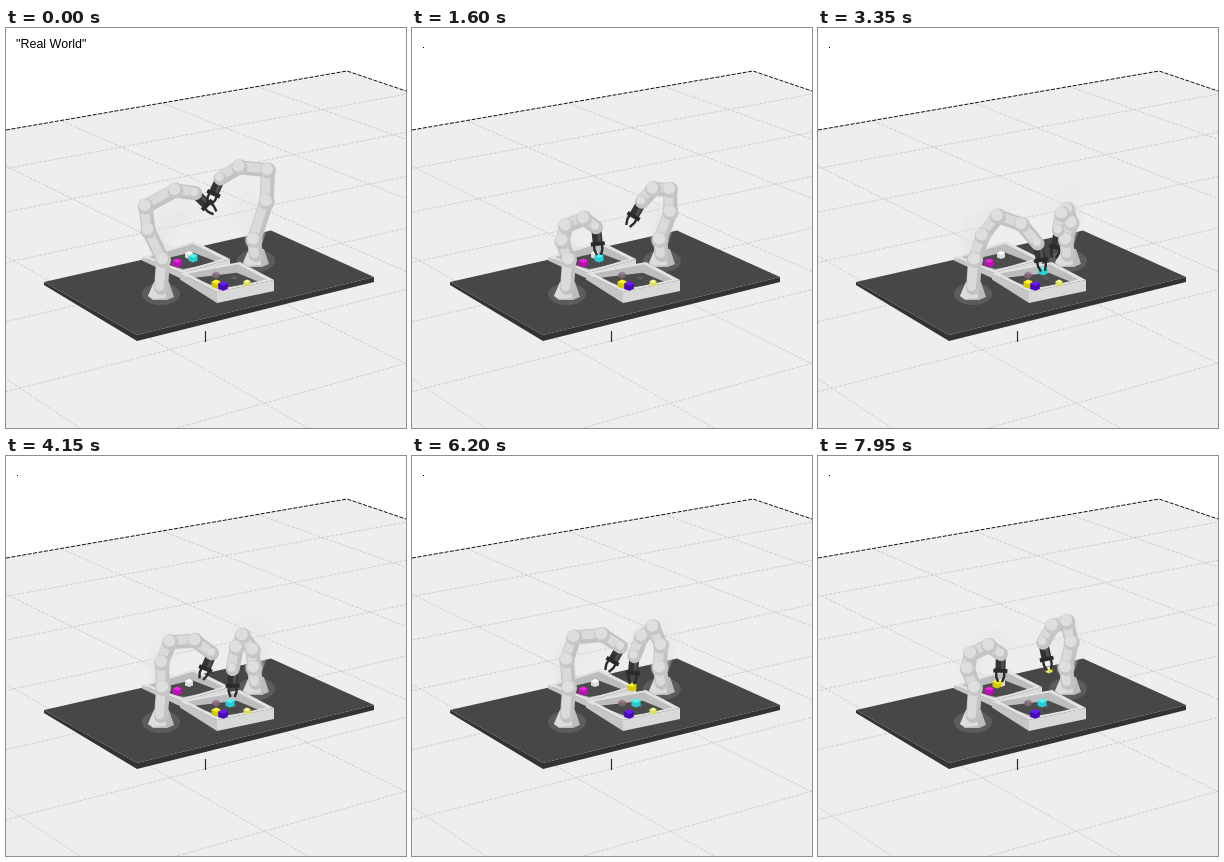
Animation of 400x400 px, one loop 8 s. Source, as an HTML page with a canvas:

```html
<!DOCTYPE html>
<html lang="en">
<head>
<meta charset="utf-8">
<title>Two robot arms sorting blocks</title>
<style>
  html, body { margin: 0; width: 100%; height: 100%; overflow: hidden; background: #fff; }
  canvas { display: block; width: 100vw; height: 100vh; }
</style>
</head>
<body>
<canvas id="stage" width="400" height="400"></canvas>
<script>
const ctx = document.getElementById('stage').getContext('2d');
const LOOP = 8000;
const GRIPPER = 28;
const STOPS = [0, 1600, 3350, 4850, 6200, 7050, 7950];

// Each reach is the fingertip's x, y and the gripper's angle in degrees at one stop.
const leftArm = {
  base: [155, 268], shoulder: [157, 232], side: 1, lift: 4,
  reaches: [[209, 185, 45], [187, 227, 84], [225, 243, 79], [171, 207, 140],
            [195, 215, 120], [228, 228, 66], [182, 226, 92]]
};
const rightArm = {
  base: [250, 235], shoulder: [248, 212], side: -1, lift: 22,
  reaches: [[203, 176, 114], [216, 198, 120], [236, 230, 100], [219, 250, 82],
            [220, 228, 95], [232, 242, 88], [231, 214, 78]]
};

const mix = (a, b, k) => a.map((v, i) => v + (b[i] - v) * k);
const shift = (p, dx, dy) => [p[0] + dx, p[1] + dy];
const clamp = v => Math.max(0, Math.min(1, v));
const ease = v => v * v * (3 - 2 * v);
const progress = (t, start, end) => ease(clamp((t - start) / (end - start)));

function trace(points) {
  ctx.beginPath();
  points.forEach(p => ctx.lineTo(...p));
}
function shape(color, ...points) {
  trace(points);
  ctx.fillStyle = color;
  ctx.fill();
}
function line(color, width, ...points) {
  trace(points);
  ctx.strokeStyle = color;
  ctx.lineWidth = width;
  ctx.stroke();
}
function oval(color, x, y, rx, ry = rx) {
  ctx.beginPath();
  ctx.ellipse(x, y, rx, ry, 0, 0, Math.PI * 2);
  ctx.fillStyle = color;
  ctx.fill();
}

// Floor position in cells from the far corner, in perspective.
function floorPoint(i, j) {
  const a = -0.0303 * i, b = -0.0412 * j, w = 1 + a + b;
  return [(341 + 3200 * a - 1210 * b) / w, (43 - 455 * a - 460 * b) / w];
}

function drawFloor() {
  ctx.fillStyle = '#fff';
  ctx.fillRect(0, 0, 400, 400);
  shape('#eee', [0, 102], [341, 43], [400, 63], [400, 400], [0, 400]);
  ctx.setLineDash([3, 1.5]);
  for (let n = 1; n < 12; n++) {
    line('#c4c4c4', 0.8, floorPoint(n, 0), floorPoint(n, 12));
    line('#c4c4c4', 0.8, floorPoint(0, n), floorPoint(12, n));
  }
  ctx.setLineDash([4, 1.5]);
  line('#111', 1, [0, 102], [341, 43], [400, 63]);
  ctx.setLineDash([]);
  line('#24246c', 1.2, [199.5, 303], [199.5, 314]);
}

function drawTable() {
  shape('#333', [38, 254], [131, 307], [368, 249], [368, 254], [131, 313], [38, 257]);
  shape('#474747', [38, 254], [265, 202.5], [368, 249], [131, 307]);
}

// A bin from its rim corners: left, back, right, front.
function drawBin([left, back, right, front], wall) {
  const rim = [left, back, right, front];
  const center = mix(mix(left, right, .5), mix(back, front, .5), .5);
  const inner = rim.map(p => mix(p, center, .16));
  const floor = inner.map((p, i) => shift(mix(p, center, .12), 0, [4, 7, 4, 0][i]));
  shape('#c6c6c6', left, front, shift(front, 0, wall), shift(left, 0, wall * .6));
  shape('#d9d9d9', front, right, shift(right, 0, wall), shift(front, 0, wall));
  shape('#e3e3e3', ...rim);
  shape('#bdbdbd', ...inner);
  ctx.save();
  trace(inner);
  ctx.clip();
  shape('#4c4c4c', ...floor);
  ctx.restore();
}

function block([x, y], top, side, r = 4) {
  shape(side, [x - r, y - r * .5], [x + r, y - r * .5], [x + r, y + r * .6], [x, y + r], [x - r, y + r * .6]);
  shape(top, [x - r, y - r * .5], [x, y - r], [x + r, y - r * .6], [x + r * .2, y]);
}

// Solves the whole arm from the fingertip and the gripper angle.
function poseAt(arm, t) {
  const k = STOPS.findLastIndex((stop, i) => i < STOPS.length - 1 && stop <= t);
  const [x, y, degrees] = mix(arm.reaches[k], arm.reaches[k + 1], progress(t, STOPS[k], STOPS[k + 1]));
  const angle = degrees * Math.PI / 180;
  const wrist = [x - GRIPPER * Math.cos(angle), y - GRIPPER * Math.sin(angle)];
  const bend = arm.side * .5;
  const dx = wrist[0] - arm.shoulder[0], dy = wrist[1] - arm.shoulder[1];
  const elbow = shift(mix(arm.shoulder, wrist, .5), dy * bend, -dx * bend - arm.lift);
  const upper = shift(mix(arm.shoulder, elbow, .55), -5 * arm.side, 0);
  const forearm = shift(mix(elbow, wrist, .6), 0, -8);
  return { links: [arm.shoulder, upper, elbow, forearm, wrist], wrist, tip: [x, y], angle };
}

function drawGripper({ wrist, angle }) {
  const palm = GRIPPER * .6;
  ctx.save();
  ctx.translate(...wrist);
  ctx.rotate(angle);
  ctx.lineCap = 'butt';
  line('#343434', 10, [2, 0], [palm, 0]);
  line('#505050', 3, [4, -2], [palm - 2, -2]);
  line('#2a2a2a', 4, [palm, -7], [palm, 7]);
  for (const s of [-1, 1]) {
    line('#2b2b2b', 2.4, [palm, 4 * s], [GRIPPER * .8, 4 * s], [GRIPPER, 2 * s]);
  }
  ctx.restore();
}

function drawArm(arm, pose) {
  const [x, y] = arm.base;
  const links = [[x, y - 8], ...pose.links];
  oval('rgba(215,215,215,.14)', x, y - 2, 19, 11);
  shape('#bcbcbc', [x - 7, y - 14], [x + 8, y - 14], [x + 13, y + 1], [x + 6, y + 4], [x - 8, y + 4], [x - 13, y]);
  shape('#dcdcdc', [x - 7, y - 14], [x + 4, y - 14], [x + 5, y + 2], [x - 8, y + 3], [x - 13, y]);
  drawGripper(pose);
  ctx.lineCap = ctx.lineJoin = 'round';
  line('#c2c2c2', 14, ...links);
  line('#dadada', 9, ...links.map(p => shift(p, -1.5, -1.5)));
  for (const [px, py] of pose.links) {
    const r = px === pose.wrist[0] ? 6 : 8;
    oval('#c6c6c6', px, py, r);
    oval('#dedede', px - 1, py - 1.5, r - 2);
  }
}

// Faint trail of where the arms reach over the loop.
function drawGhosts() {
  ctx.lineCap = ctx.lineJoin = 'round';
  for (const arm of [leftArm, rightArm]) {
    for (const stop of STOPS) {
      line('rgba(222,222,222,.1)', 18, ...poseAt(arm, stop).links.slice(0, 4));
    }
  }
  ctx.lineCap = 'butt';
}

function drawBlocks(t, leftTip, rightTip) {
  block([183, 227], '#fff', '#dcdcdc');
  block([171, 235], '#ee22e2', '#bd10b5', 4.5);
  block([210, 247], '#9b7c96', '#7d6577', 3.5);
  block([228, 252], '#5c5c5c', '#494949');

  const lifted = mix([187, 230], leftTip, progress(t, 1600, 1800));
  block(mix(lifted, [224, 247], progress(t, 3350, 3500)), '#4ff5f2', '#27cdd0', 4.5);

  const held = mix([210, 256], shift(rightTip, 0, 3), progress(t, 4900, 5100));
  const passed = mix(held, shift(leftTip, -3, 2), progress(t, 6300, 6700));
  block(passed, '#fff625', '#d3cb00', 4.5);
  block([217, 258], '#6c1aff', '#4908bb', 4.8);

  block(mix([241, 255], rightTip, progress(t, 7080, 7250)), '#fcfb9a', '#dede5b', 3.5);
}

function drawLabel(t) {
  ctx.fillStyle = '#000';
  if (t < 400) {
    ctx.font = '12.5px "Liberation Sans", sans-serif';
    ctx.fillText('"Real World"', 10, 20);
  } else {
    ctx.fillRect(11, 19, 1, 1);
  }
}

function render(t) {
  const left = poseAt(leftArm, t), right = poseAt(rightArm, t);
  ctx.lineCap = 'butt';
  drawFloor();
  drawTable();
  drawGhosts();
  drawBin([[136, 229], [188, 213], [224, 231], [176, 245]], 6);
  drawBin([[174, 245], [234, 234], [268, 252], [211, 264]], 11);
  drawBlocks(t, left.tip, right.tip);
  drawArm(leftArm, left);
  drawArm(rightArm, right);
  drawLabel(t);
}

const start = performance.now();
function tick() {
  render(Math.max(0, performance.now() - start) % LOOP);
  requestAnimationFrame(tick);
}
tick();
</script>
</body>
</html>
```
